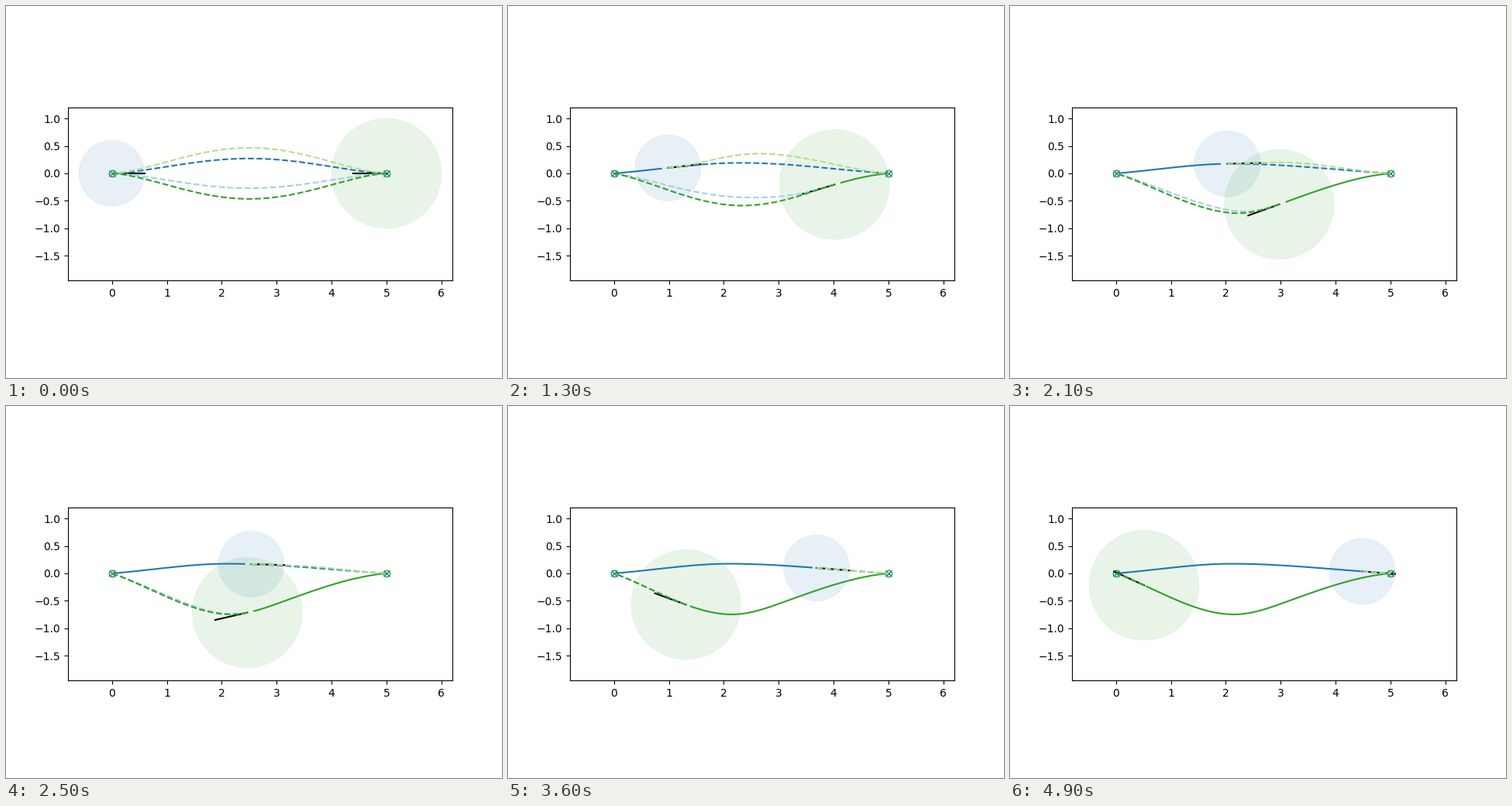
Animation, 640 px wide and 480 px high, one loop 5000 ms. Source, as a matplotlib script:

```python
import numpy as np
import matplotlib.pyplot as plt
from matplotlib.animation import FuncAnimation

FRAMES, INTERVAL = 50, 100
GOAL = 5.0
BLUE, LIGHT_BLUE = "#1f78b4", "#a6cee3"
GREEN, LIGHT_GREEN = "#33a02c", "#b2df8a"


def travelled(step):
    """Critically damped approach to the goal that stiffens slightly."""
    s = step * (0.0569 + 0.000446 * step)
    return GOAL * (1 - (1 + s) * np.exp(-s))


def hermite(x, knots):
    """Cubic through (position, value, slope) knots."""
    px, py, slope = np.array(knots).T
    i = np.clip(np.searchsorted(px, x, side="right") - 1, 0, len(px) - 2)
    h = px[i + 1] - px[i]
    t = (x - px[i]) / h
    return ((1 + 2 * t) * (1 - t) ** 2 * py[i] + t * (1 - t) ** 2 * h * slope[i]
            + t * t * (3 - 2 * t) * py[i + 1] + t * t * (t - 1) * h * slope[i + 1])


class Agent:
    """Drives from one end to the other; distances run from its own start."""

    def __init__(self, start, side, radius, color, knots):
        self.start, self.side = start, side
        self.direction = 1 if start == 0 else -1
        self.radius, self.color, self.knots = radius, color, knots

    def offset(self, u):
        return hermite(u, self.knots)

    def to_plane(self, u, offset):
        return self.start + self.direction * u, self.side * offset

    def history(self, step):
        u = travelled(np.linspace(0, max(step - 1, 0), 4 * step + 1))
        return self.to_plane(u, self.offset(u))

    def heading(self, step):
        """Needle along the latest move, level while at rest."""
        before, now = travelled(max(step - 1, 0)), travelled(step)
        rise = self.offset(now) - self.offset(before)
        slope = rise / (now - before) if step else 0
        reach = 0.6 / np.hypot(1, slope) * np.array([0, 1])
        return self.to_plane(now + reach, self.offset(now) + slope * reach)

    def plan(self, step, bump, lifetime):
        """First guess, a plain bump, that fades into the driven path."""
        now = travelled(step)
        u = np.linspace(now, GOAL, 120)
        guess = bump * np.clip(np.sin(np.pi * u / GOAL), 0, 1) ** 1.5
        blend = np.clip(2 * now, 0.01, 1)
        release = 1 - np.exp(-((u - now) / blend) ** 2)
        fade = np.exp(-(step / lifetime) ** 2.5)
        settled = self.offset(u)
        return self.to_plane(u, settled + fade * release * (guess - settled))


blue = Agent(0, 1, 0.6, BLUE,
             [(0, 0, 0.075), (2.1, 0.175, 0), (GOAL, 0, -0.06)])
green = Agent(GOAL, -1, 1.0, GREEN,
              [(0, 0, 0.09), (2.0, 0.555, 0.36), (2.85, 0.748, 0), (GOAL, 0, -0.37)])
agents = (blue, green)

# agent, colour, bump height, lifetime of the first guess in steps
plans = [
    (blue, BLUE, 0.27, 11),
    (green, LIGHT_BLUE, 0.27, 19),
    (blue, LIGHT_GREEN, 0.465, 19.5),
    (green, GREEN, 0.465, 16.5),
]

fig, ax = plt.subplots(figsize=(6.4, 4.8), dpi=100)
ax.set_aspect("equal")
ax.set_xlim(-0.8, 6.2)
ax.set_ylim(-1.947, 1.2)

discs, trails, needles = [], [], []
for agent in agents:
    discs.append(ax.add_patch(plt.Circle(
        (agent.start, 0), agent.radius, color=agent.color, alpha=0.11, lw=0.4)))
    ax.plot(agent.start, 0, "o", color=agent.color, fillstyle="none")
    ax.plot(GOAL - agent.start, 0, "x", color=agent.color)
    trails.append(ax.plot([], [], color=agent.color)[0])
    needles.append(ax.plot([], [], color="black")[0])
dashes = [ax.plot([], [], "--", color=color, zorder=3)[0] for _, color, *_ in plans]


def draw(step):
    u = travelled(step)
    for agent, disc, trail, needle in zip(agents, discs, trails, needles):
        disc.center = agent.to_plane(u, agent.offset(u))
        trail.set_data(*agent.history(step))
        needle.set_data(*agent.heading(step))
    for line, (agent, _, bump, lifetime) in zip(dashes, plans):
        line.set_data(*agent.plan(step, bump, lifetime))
    return discs + trails + needles + dashes


anim = FuncAnimation(fig, draw, frames=FRAMES, interval=INTERVAL,
                     init_func=lambda: draw(0), repeat=True, repeat_delay=0)
plt.show()
```
